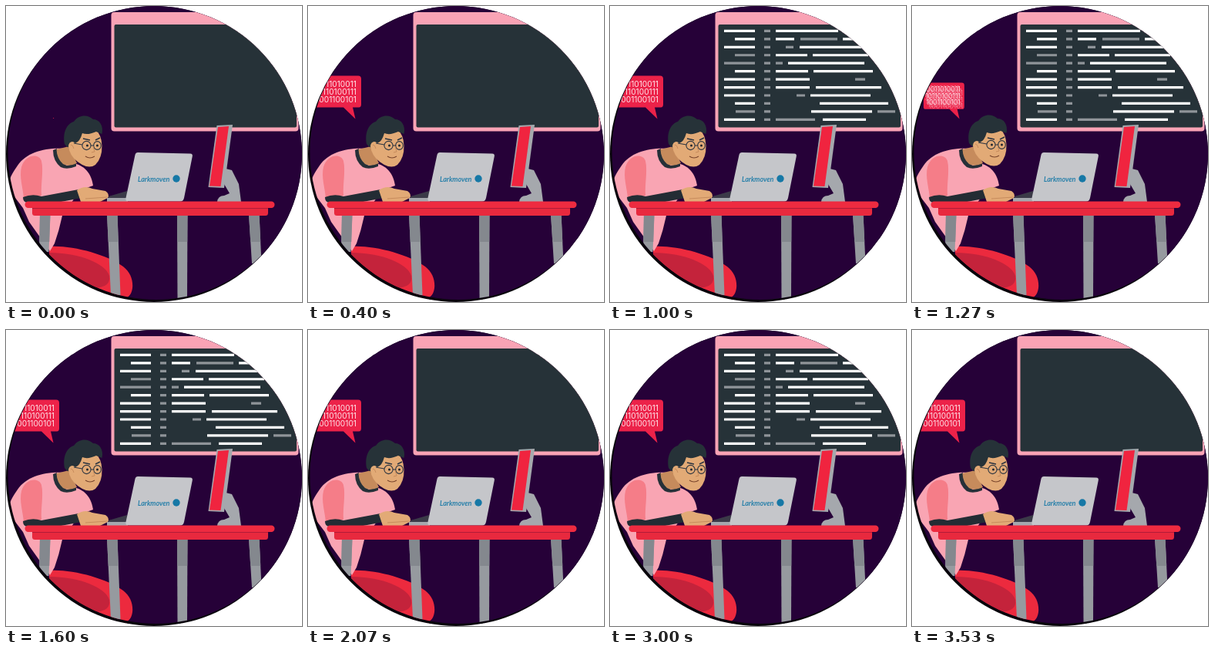
Recreate the animation shown at these times as an HTML page. Size 384 px wide and 384 px high, loop 3590 ms.

```html
<!DOCTYPE html>
<html lang="en">
<head>
<meta charset="utf-8">
<title>Coder at a desk</title>
<style>
  html, body { margin: 0; width: 100%; height: 100%; overflow: hidden; background: #fff; }
  svg { display: block; width: 100vw; height: 100vh; }
  .bits { font: 10.2px Inter, "Open Sans", sans-serif; fill: #ffe3e8; text-anchor: end; }
  .brand { font: italic 600 9px Lato, "Open Sans", sans-serif; fill: #1678a6; }
</style>
</head>
<body>
<svg viewBox="0 0 384 384">
  <defs>
    <clipPath id="disc"><circle cx="192" cy="192" r="192"/></clipPath>
    <clipPath id="scene"><circle cx="194.5" cy="189" r="192"/></clipPath>
  </defs>
  <g clip-path="url(#disc)">
  <rect width="384" height="384" fill="#08040b"/>
  <g clip-path="url(#scene)">
    <rect width="384" height="384" fill="#260138"/>

    <!-- wall screen -->
    <rect x="136.5" y="8" width="243" height="154.5" rx="4" fill="#f9a3b5"/>
    <rect x="140.5" y="24" width="236.5" height="133.5" rx="2" fill="#263238"/>
    <g id="code"></g>

    <!-- speech bubble -->
    <g id="bubble">
      <path d="M9 90.5H65Q69 90.5 69 94.5V127.5Q69 131.5 66 131.5H58L61.5 146.5L46 131.5H9Q6 131.5 6 128V94.5Q6 90.5 9 90.5Z" fill="#ec2249"/>
      <g id="bits" class="bits"></g>
    </g>

    <!-- chair -->
    <path d="M56 312C85 310 130 322 152 338C162 346 165 356 164 366Q162 379 152 379C125 383 85 366 56 345Z" fill="#ec2a3e"/>
    <path d="M56 320C95 320 129 334 134 350Q136 362 122 365C97 367 70 352 56 344Z" fill="#c4233b"/>

    <!-- body -->
    <path d="M78 185C52 183 27 189 15 207C8 217 3 225 3 237L22 262L30 280L57 318L63 308Q69 291 73 272L96 239L113 233C111 217 101 206 87 204Z" fill="#f9a5b3"/>
    <path d="M46 201C43 191 25 192 20 209C17 222 22 236 23 249L46 246C45 230 49 214 46 201Z" fill="#f57d88"/>
    <path d="M61 187L66 185Q67 202 79 207L91 204L91 208Q79 213 71 209Q61 201 61 187Z" fill="#263038"/>
    <path d="M65.500 186L82 182L92 204Q81 209 74 205Q66 198 65.500 186Z" fill="#c68b5c"/>
    <path d="M22 248Q34 243 46 247L94 238L98 249L66 255H28Q22 255 22 248Z" fill="#232c34"/>
    <path d="M133 247L157 240V253H133Z" fill="#3b3a48"/>
    <path d="M131 249H158V254H131Z" fill="#a5a8ae"/>
    <path d="M92 239Q102 232 112 237L129 240Q135 244 132 249L122 254H97Z" fill="#e2aa76"/>
    <path d="M103 250L131 248" stroke="#c68b5c"/>

    <!-- head -->
    <g id="head">
      <path d="M84 163L116 160Q124 167 124.500 181Q125 197 116 206Q109 211 99 206Q86 199 82 187Z" fill="#e2aa76"/>
      <path d="M76 179C73 163 80 152 88 150C95 140 107 141 113 147C121 147 127 155 124.500 166L117 163Q106 168 99 165Q96 176 90 178L88 184Q81 186 76 179Z" fill="#263238"/>
      <ellipse cx="86" cy="182" rx="5" ry="6" fill="#e2aa76"/>
      <path d="M84 180Q87 180 88 185" fill="none" stroke="#c68b5c"/>
      <g fill="none" stroke="#2b3440" stroke-width="1.1">
        <path d="M88 178L99 180M110 181H114"/>
        <circle cx="104.500" cy="181" r="5.600"/>
        <ellipse cx="118.500" cy="181" rx="4.800" ry="5.400"/>
        <path d="M100 172L109 174M116 174L122 171" stroke-width="1.500"/>
        <path d="M113 182L115 189L111 190" stroke="#c68b5c" stroke-width="1"/>
        <path d="M103 195Q109 199 115 195" stroke="#7a452c"/>
      </g>
      <circle cx="105.500" cy="181" r="1.500" fill="#202830"/>
      <circle cx="118.500" cy="181" r="1.500" fill="#202830"/>
    </g>

    <!-- laptop -->
    <path d="M171 190L239 191.500Q242.500 191.500 241.800 195L231 249Q230 253.500 226 253.500H159Q154.500 253.500 155.500 249L167.500 193Q168.300 190 171 190Z" fill="#c5c6ca"/>
    <text class="brand" x="171" y="228">Larkmoven</text>
    <circle cx="221" cy="224" r="4.700" fill="#1678a6"/>

    <!-- desktop monitor -->
    <path d="M285 211L293 213L302 231L305 254H274Q275 246 283 246L290 243L283 231Z" fill="#a5a8ad"/>
    <path d="M273.500 155L294 154L283 236L262.500 235Z" fill="#a5a8ad"/>
    <path d="M275 157L289 156L278.500 234L264 233.500Z" fill="#f0243f"/>

    <!-- table -->
    <g id="legs"></g>
    <rect x="34" y="258" width="306" height="14" rx="3.500" fill="#e8293e"/>
    <rect x="34" y="258" width="306" height="5" fill="#b01c38"/>
    <rect x="24.500" y="253.500" width="324" height="8.500" rx="4.200" fill="#ee2b40"/>
  </g>
  </g>
</svg>
<script>
const LOOP = 3590, CODE_CYCLE = LOOP / 2, BUBBLE_CYCLE = LOOP / 3;
const $ = id => document.getElementById(id);
const clamp = v => Math.max(0, Math.min(1, v));

function add(parent, tag, attrs, text = '') {
  const el = document.createElementNS('http://www.w3.org/2000/svg', tag);
  for (const name in attrs) el.setAttribute(name, attrs[name]);
  el.textContent = text;
  return parent.appendChild(el);
}

// Each leg: upper left x, lower left x, lower y.
[[44, 43, 319], [131, 136, 375], [222, 222.5, 380], [315, 319, 334]].forEach(([x, foot, y]) => {
  const knee = x + (foot - x) * 36 / (y - 270);
  add($('legs'), 'path', { d: `M${x} 270H${x + 13.5}L${foot + 12.5} ${y}H${foot}Z`, fill: '#969a9f' });
  add($('legs'), 'path', { d: `M${x} 270H${x + 13.5}L${knee + 13} 306H${knee}Z`, fill: '#84888e' });
});

// Code rows: start-end pairs, "g" marks a grey dash.
const rows = [
  '148-188 215-296', '162-188 215-239 g247-295 302-335',
  '148-188 g228-238 246-335', 'g162-188 215-256 263-335',
  'g148-188 g215-224 231-330', '162-188 215-257 264-341',
  '148-188 215-259 g318-331', '148-188 215-259 267-352',
  '148-188 g242-253 260-338', '162-188 272-361',
  'g163-188 261-340 g347-370', '148-188 g215-266 276-332'
];
const dashes = rows.flatMap((row, i) => [...row.split(' '), 'g200-208'].map(part => {
  const grey = part[0] === 'g';
  const [from, to] = part.replace('g', '').split('-').map(Number);
  const el = add($('code'), 'path', { fill: grey ? '#8f9499' : '#fff' });
  return { el, from, to, y: 32.4 + i * 10.45, rank: rows.length - 1 - i };
}));

const bits = ['10011010011', '10110100111', '1001100101'];
const addBits = (parent, dx, dy) => bits.forEach((line, i) =>
  add(parent, 'text', { x: 63 + dx, y: 104.8 + dy + i * 10 }, line));
addBits($('bits'), 0, 0);
const smear = add($('bits'), 'g', { opacity: 0.45 });
[[2, 3], [4, 6], [-2, -2]].forEach(([dx, dy]) => addBits(smear, dx, dy));

// Rows are drawn from the bottom upward, each dash from left to right with a tapered end.
function drawCode(t) {
  const visible = t < 1670;
  for (const { el, from, to, y, rank } of dashes) {
    const p = visible ? clamp((t - 540 - 75 * rank + 4 * rank * rank) / 90) : 0;
    const body = from + (to - from) * p;
    const tip = from + (to - from) * Math.min(1, p * 1.45);
    el.setAttribute('d', p ? `M${from} ${y - 1.6}H${body}L${tip} ${y}L${body} ${y + 1.6}H${from}Z` : '');
  }
}

function drawBubble(t) {
  const p = clamp(t / 163);
  const scale = 1 - (1 - p) ** 3;
  $('bubble').setAttribute('transform', `translate(62 146) scale(${scale}) translate(-62 -146)`);
  smear.style.display = p < 1 ? '' : 'none';
  const nod = Math.sin(Math.PI * clamp(t / 150));
  $('head').setAttribute('transform', `translate(${-2 * nod} ${-nod})`);
}

const start = performance.now();
function frame() {
  const t = (performance.now() - start) % LOOP;
  drawCode(t % CODE_CYCLE);
  drawBubble(t % BUBBLE_CYCLE);
  requestAnimationFrame(frame);
}
frame();
</script>
</body>
</html>
```
